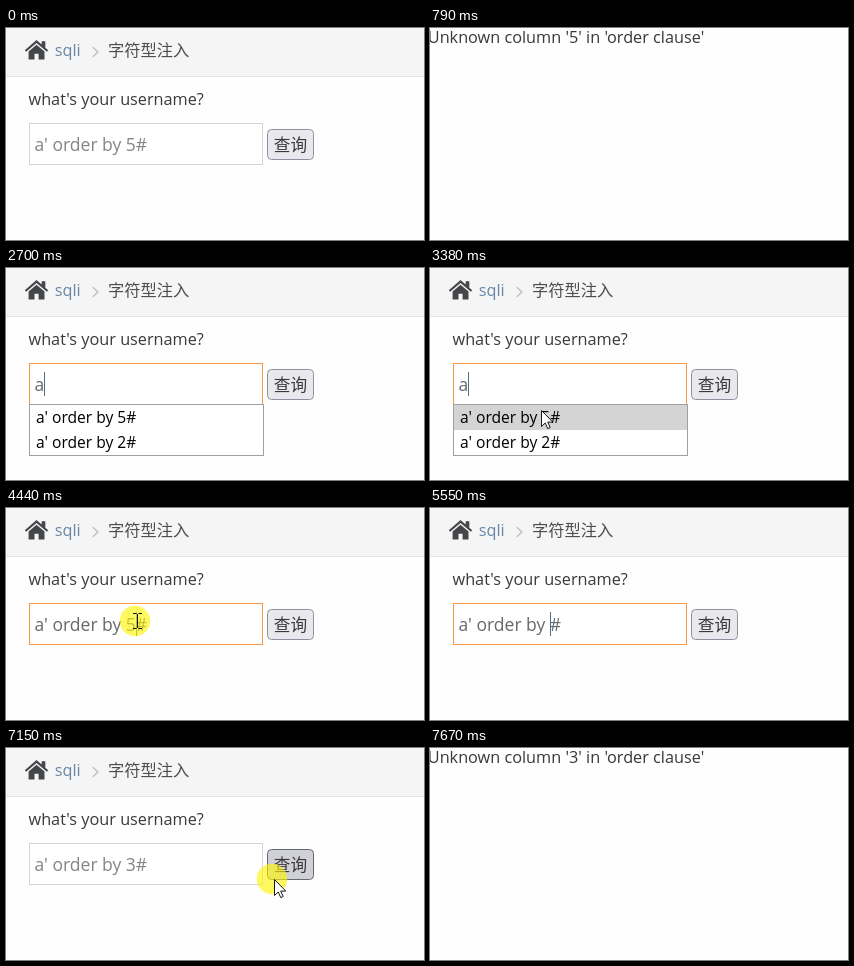
Animation of 418 by 212 pixels, one loop 8 s. Source, as an HTML page:

```html
<!DOCTYPE html>
<html lang="zh-CN">
<head>
<meta charset="utf-8">
<style>
html, body { margin: 0; width: 100%; height: 100%; overflow: hidden; background: #fefefe; }
svg { display: block; width: 418px; height: 212px; }
text { font: 16.25px "Open Sans", "Noto Sans CJK SC", "Noto Sans CJK", sans-serif; fill: #393939; white-space: pre; }
#value { font-size: 17.5px; }
#popup text { font-size: 15.6px; fill: #000; }
</style>
</head>
<body>
<svg viewBox="0 0 418 212">
  <rect width="418" height="212" fill="#fefefe"/>
  <g id="form">
    <rect width="418" height="48" fill="#f5f5f5"/>
    <rect y="48" width="418" height="1" fill="#e5e5e5"/>
    <g fill="#444649">
      <path d="M18.8 22.2 30.5 12 35.7 16.5V13.2H39.3V19.7L42.2 22.2 40.9 23.8 30.5 15 20.1 23.8Z"/>
      <path d="M22.6 23.6 30.5 16.8 38.5 23.6V31.6H32.6V25.8H28.5V31.6H22.6Z"/>
    </g>
    <text x="48.7" y="28" style="fill:#6688a6">sqli</text>
    <path d="M86.8 19 91.8 24 86.8 29" fill="none" stroke="#c0c4ca" stroke-width="1.6"/>
    <text x="102" y="28" style="fill:#4d4d4d">字符型注入</text>
    <text x="22.5" y="77">what's your username?</text>
    <rect id="field" x="23.5" y="95.5" width="233" height="41" fill="#fff"/>
    <text id="value" x="28.5" y="123"></text>
    <rect id="caret" y="104" width="1" height="24" fill="#4f6f86"/>
    <rect id="button" x="261.5" y="101.5" width="46" height="30" rx="4"/>
    <text x="284.5" y="122.5" text-anchor="middle" style="font-size:16.67px">查询</text>
    <g id="popup">
      <rect x="23.5" y="136.5" width="234" height="51" fill="#fff" stroke="#a0a0a0"/>
      <rect id="row" x="24" y="137" width="233" height="25" fill="#d4d4d4"/>
      <text x="30" y="155">a' order by 5#</text>
      <text x="30" y="180">a' order by 2#</text>
    </g>
  </g>
  <text id="error" x="-2.2" y="15"></text>
  <circle id="halo" r="15.3" fill="#fff500" opacity=".62"/>
  <path id="arrow" d="M.5.5V16.5L4.2 13 6.8 18.6 9.2 17.5 6.7 12.1H11.8Z" fill="#fff" stroke="#000" stroke-width=".9"/>
  <path id="beam" d="M-4.5-7.5H-1M1-7.5H4.5M0-7V7M-4.5 7.5H-1M1 7.5H4.5" fill="none" stroke="#111"/>
</svg>
<script>
const LOOP = 8000, BLINK = 520, CLICK = 150;
const FAIL = 210, BACK = 1500, FOCUS = 2200, TYPE = 2640, PICK = 3700,
      AIM = 4400, ERASE = 5550, RETYPE = 5820, SUBMIT = 7080, REFAIL = 7280;

const spot = {
  away: { x: 8, y: -24 }, field: { x: 91, y: 106 }, row: { x: 111, y: 142 },
  digit: { x: 131, y: 113 }, button: { x: 268, y: 131 }
};

// Each move glides from one spot to the next, then rests until it is hidden or moves on
const move = (from, to, start, end, until) => ({ from, to, start, end, until });
const moves = [
  move('button', 'button', 70, 71, 280),
  move('button', 'away', 280, 650, 650),
  move('away', 'field', 1600, 2090, TYPE),
  move('field', 'row', 2900, 3300, PICK),
  move('row', 'digit', PICK, AIM, 5100),
  move('digit', 'button', 6230, 6665, 7250),
  move('button', 'away', 7250, 7620, 7620)
];
const clicks = [70, 2300, PICK - CLICK, 4340, 7010];

const $ = id => document.getElementById(id);
const within = (v, a, b) => v >= a && v < b;
const show = (id, on) => $(id).setAttribute('visibility', on ? 'inherit' : 'hidden');
const place = (id, x, y) => $(id).setAttribute('transform', `translate(${x} ${y})`);
const write = (id, s) => { if ($(id).textContent !== s) $(id).textContent = s; };
const paint = (id, fill, stroke) => {
  $(id).setAttribute('fill', fill);
  $(id).setAttribute('stroke', stroke);
};

// Ease out along a path that bows slightly upwards
function pointerAt(t) {
  const m = moves.find(m => within(t, m.start, m.until));
  if (!m) return null;
  const a = spot[m.from], b = spot[m.to];
  const u = Math.min(1, (t - m.start) / (m.end - m.start));
  const k = 1 - (1 - u) ** 2;
  const bow = a === b ? 0 : 14 * Math.sin(Math.PI * k);
  return { x: a.x + (b.x - a.x) * k, y: a.y + (b.y - a.y) * k - bow };
}

function valueAt(t) {
  if (within(t, BACK, TYPE)) return '';
  if (within(t, TYPE, PICK)) return 'a';
  const digit = t < ERASE ? '5' : t < RETYPE ? '' : '3';
  return `a' order by ${digit}#`;
}

function caretOn(t) {
  if (t >= 6230) return false;
  if (within(t, TYPE, PICK) || t >= ERASE) return true;
  return t >= AIM && Math.floor((t - AIM + 90) / BLINK) % 2 === 0;
}

function drawForm(t, p) {
  const focused = within(t, FOCUS, SUBMIT);
  const hinting = within(t, TYPE, PICK);
  const hover = p && within(p.x, 261, 308) && within(p.y, 101, 132);

  paint('field', '#fff', focused ? '#f59942' : within(t, 2000, FOCUS) ? '#b5b5b5' : '#d5d5d5');
  paint('button', hover ? '#d0d0d7' : '#e9e9ed', hover ? '#676774' : '#8f8f9d');
  write('value', valueAt(t));
  $('value').style.fill = focused ? '#696969' : '#858585';
  $('caret').setAttribute('x', hinting ? 38 : within(t, ERASE, RETYPE) ? 120 : 130);
  show('caret', caretOn(t));
  show('popup', hinting || within(t, ERASE + 60, RETYPE + 60));
  show('row', within(t, 3050, PICK));
}

function drawPointer(t, p, failed) {
  const inField = p && within(p.x, 23, 257) && within(p.y, 95, 137);
  const beam = inField && !failed && !within(t, 2400, PICK);
  const pressed = p && clicks.some(c => within(t, c, c + CLICK));
  show('halo', pressed);
  show('beam', beam);
  show('arrow', p && !beam);
  if (!p) return;
  const x = Math.round(p.x), y = Math.round(p.y);
  place('halo', x - 2, y);
  place('beam', x + .5, y);
  place('arrow', x, y);
}

function draw(t) {
  const failed = within(t, FAIL, BACK) || t >= REFAIL;
  const p = pointerAt(t);
  show('form', !failed);
  show('error', failed);
  write('error', `Unknown column '${t < BACK ? 5 : 3}' in 'order clause'`);
  drawForm(t, p);
  drawPointer(t, p, failed);
}

const start = performance.now();
function tick() {
  draw((performance.now() - start) % LOOP);
  requestAnimationFrame(tick);
}
tick();
</script>
</body>
</html>
```
